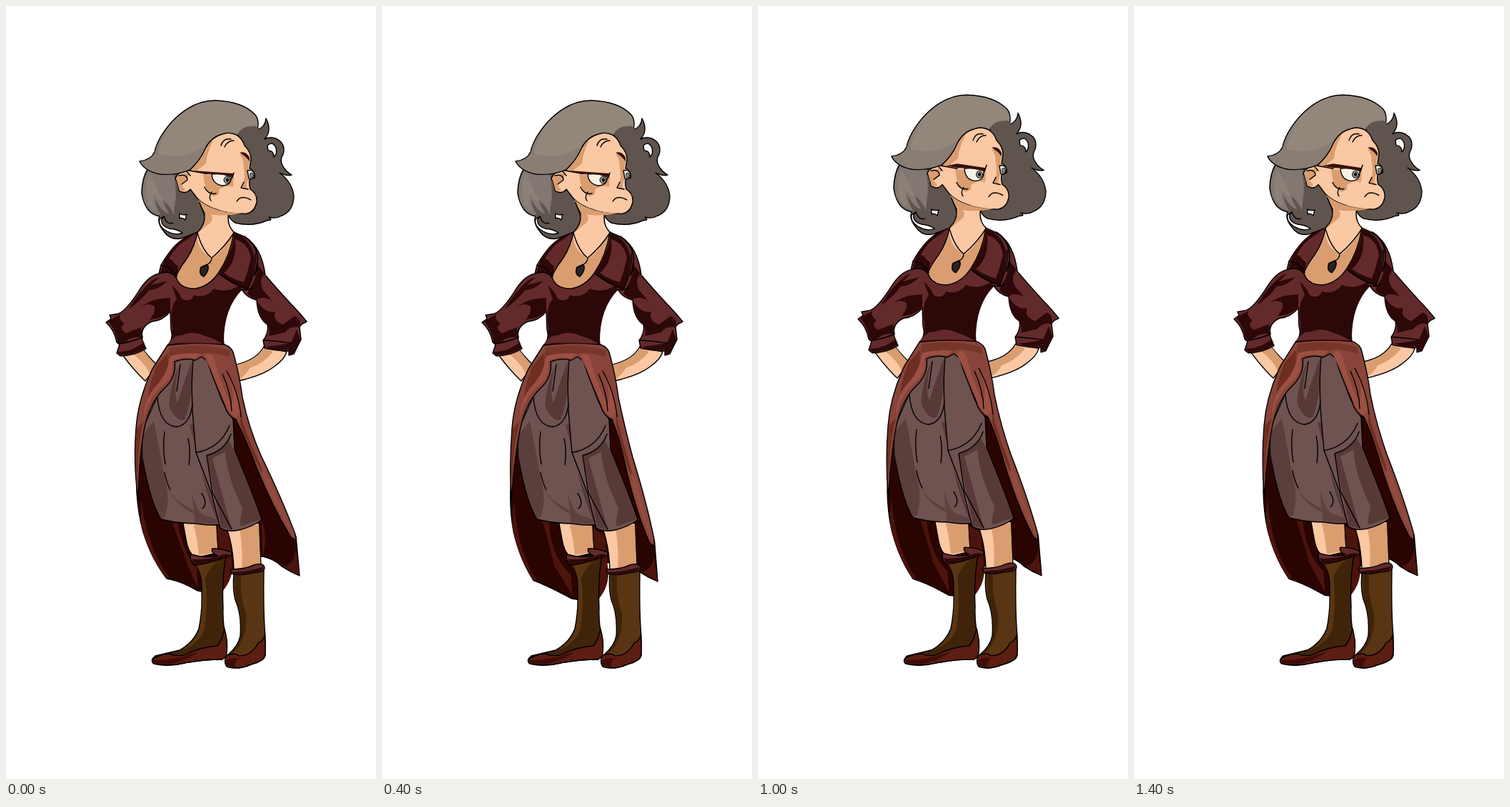
An HTML page for the animation above (1.6 s loop, 518x1080 px).

```html
<!DOCTYPE html>
<html lang="en">
<head>
<meta charset="utf-8">
<title>Idle stance</title>
<style>
html, body { margin: 0; width: 100%; height: 100%; overflow: hidden; background: #fff }
svg { display: block; width: 100%; height: 100% }
path, ellipse { stroke: #000; stroke-width: 1.4; stroke-linejoin: round; stroke-linecap: round }
.n { stroke: none }
.l { fill: none }
.white { fill: #fff }
.skin { fill: #fbc8a4 } .tan { fill: #d99d70 }
.hair { fill: #93867b } .hairMid { fill: #827871 } .hairDark { fill: #60544f }
.shirt { fill: #632a2c } .shirtDark { fill: #2d0808 }
.coat { fill: #88443a } .coatDark { fill: #6f2e22 } .coatLight { fill: #9c5043 }
.lining { fill: #2a0401 } .liningRed { fill: #4b140c }
.pants { fill: #6e5350 } .pantsDark { fill: #573a38 }
.boot { fill: #593513 } .bootDark { fill: #40240a }
.shoe { fill: #5c1d12 } .shoeDark { fill: #3f0d09 }
.eye { fill: #f6f2e6 } .iris { fill: #8d8b88; stroke-width: .9 } .brow { fill: #35100b }
</style>
</head>
<body>
<svg viewBox="0 0 518 1080">
<g id="figure">
  <!-- coat lining -->
  <path class="lining sway" d="M195 575 Q182 630 183 680 Q185 710 192 735 Q204 773 225 800 Q247 804 268 817 L299 822 L310 800 L335 770 L359 769 Q377 773 386 783 Q398 791 411 796 L406 741 Q380 690 354 630 L318 570 Z"/>
  <path class="liningRed n sway" d="M240 718 Q247 765 267 785 L269 814 Q262 800 252 775 Q243 748 231 718 Z"/>
  <path class="liningRed n sway" d="M189 690 Q199 762 229 798 L225 800 Q200 770 189 725 Z"/>
  <path class="liningRed n sway" d="M295 724 L312 733 L317 784 Q316 805 300 821 Z"/>
  <path class="liningRed n sway" d="M358 718 Q366 740 361 764 L359 768 Z"/>
  <path class="liningRed n sway" d="M388 783 Q403 780 406 760 L411 796 Z"/>

  <!-- legs -->
  <path class="skin" d="M247 718 L252 745 Q255 764 265 771 L297 764 L294 722 Z"/>
  <path class="tan n" d="M262 721 L294 722 L296 763 L270 767 Q268 745 262 721 Z"/>
  <path class="skin" d="M309 730 Q318 755 319 788 L357 782 L354 722 Z"/>
  <path class="tan n" d="M327 730 L354 724 L356 782 L330 786 Q332 758 327 730 Z"/>

  <!-- boots -->
  <path class="bootDark" d="M263 772 Q275 790 274 820 Q275 845 270 870 Q262 890 243 900 L209 908 Q201 914 207 919 Q228 924 250 918 Q275 913 303 913 Q311 905 309 886 Q303 866 304 840 Q302 800 308 768 Z"/>
  <path class="boot n" d="M264 778 Q276 792 275 820 Q275 846 271 870 Q263 891 244 901 Q272 890 278 870 Q283 830 279 800 Q284 784 299 773 Z"/>
  <path class="shoe" d="M205 914 Q211 906 229 905 Q238 909 249 907 Q270 896 296 894 Q303 885 306 870 Q311 890 309 904 Q308 911 302 913 Q275 913 250 918 Q228 923 207 919 Q204 917 205 914 Z"/>
  <path class="shoeDark n" d="M206 914 Q226 914 248 909 L270 902 Q252 916 230 919 Q214 921 207 918 Z"/>
  <path class="shirt" d="M259 766 Q278 772 296 768 Q286 763 289 758 Q303 758 315 763 Q319 769 307 770 Q282 780 263 781 Q256 773 259 766 Z"/>
  <path class="shirtDark n" d="M260 773 Q282 775 305 766 L314 766 Q310 770 303 771 Q280 779 263 780 Z"/>
  <path class="boot" d="M319 792 Q317 814 321 830 Q330 850 328 880 Q325 895 310 907 Q304 915 309 923 Q325 928 343 920 Q360 916 363 908 L363 880 Q360 850 361 788 Z"/>
  <path class="bootDark n" d="M320 796 L329 795 Q327 825 336 850 Q338 885 319 903 L311 907 Q326 895 329 880 Q330 850 322 828 Z"/>
  <path class="shoe" d="M309 907 Q321 903 326 908 Q344 908 353 890 Q359 888 362 880 Q365 900 361 911 Q354 917 343 920 Q325 928 309 923 Q304 915 309 907 Z"/>
  <path class="shoeDark n" d="M307 915 Q316 909 326 912 Q319 917 322 924 Q306 925 307 915 Z"/>
  <path class="shirt" d="M315 787 Q335 787 347 781 Q361 777 362 785 Q362 791 345 792 Q330 796 318 794 Q313 790 315 787 Z"/>
  <path class="shirtDark n" d="M317 791 Q337 791 360 784 Q361 790 345 791 Q330 795 318 793 Z"/>

  <!-- breeches -->
  <path class="pants" d="M236 490 L285 486 Q291 525 304 555 L318 578 L320 620 Q345 680 358 718 Q346 727 327 732 Q311 736 300 729 L298 725 Q285 726 265 723 Q240 723 217 717 Q203 695 193 640 Q188 615 194 585 L212 545 Z"/>
  <path class="pantsDark n" d="M191 600 Q198 590 207 580 Q215 620 222 660 Q231 690 222 714 L217 716 Q203 690 191 630 Z" opacity=".8"/>
  <path class="pantsDark n" d="M237 515 Q230 535 228 558 Q238 582 250 578 Q263 548 260 497 Q251 520 240 555 Q233 538 243 500 Z"/>
  <path class="pantsDark n" d="M257 585 L263 585 L266 624 Q275 655 287 685 L298 724 Q282 690 274 650 Z"/>
  <path class="pantsDark n" d="M215 655 Q230 698 294 717 L297 724 L265 722 L260 680 Q270 712 280 713 Q240 710 215 655 Z" opacity=".7"/>
  <path class="pantsDark n" d="M281 628 Q300 622 312 607 L320 622 Q346 684 357 717 L329 727 Q318 690 291 632 L316 732 L301 728 Z"/>
  <path class="pants n" d="M289 632 L307 623 Q310 660 331 701 L326 730 L316 731 Z"/>
  <path class="l" d="M262 495 Q258 540 263 590 L266 624 Q278 655 288 682 L299 726"/>
  <path class="l" d="M212 547 Q215 586 239 588 Q258 585 261 556"/>
  <path class="l" d="M266 624 Q300 618 313 586 M281 628 Q307 621 315 598 M281 628 L289 680 L316 731"/>
  <path class="l" d="M222 595 Q219 620 223 640 M222 652 Q224 664 230 676 M255 604 Q259 621 256 641 M274 681 Q283 695 275 702 M244 501 L239 538"/>

  <!-- forearms -->
  <path class="skin" d="M162 486 Q178 508 195 524 L212 502 Q198 489 189 476 Z"/>
  <path class="tan n" d="M176 485 L190 478 Q199 490 210 502 L201 514 Q196 500 176 485 Z"/>
  <path class="skin" d="M361 476 Q350 496 317 502 L325 524 Q360 516 375 504 Q390 494 393 483 Z"/>
  <path class="tan n" d="M319 503 Q350 496 362 478 L374 483 Q360 500 341 506 Q337 515 326 522 Z"/>

  <!-- coat panels -->
  <path class="coat sway" d="M226 474 Q269 467 306 473 Q317 477 319 487 Q328 522 331 547 Q340 590 357 628 Q388 692 405 738 L406 747 L399 742 Q370 695 345 630 Q334 602 322 578 Q309 572 305 555 Q290 522 282 496 L274 490 L265 495 Q250 491 236 497 Q239 519 221 535 Q205 550 196 580 Q187 615 185 690 Q178 640 182 590 Q185 549 205 507 Z"/>
  <path class="coatDark n" d="M211 503 L226 485 Q230 500 222 520 Q211 530 199 548 Q201 524 211 503 Z"/>
  <path class="coatDark n" d="M229 477 Q275 470 313 481 L313 490 Q284 482 274 486 Q250 482 227 492 Z" opacity=".65"/>
  <path class="coatLight n" d="M230 489 Q249 484 272 486 L265 492 Q238 489 233 497 Q236 518 217 532 Q198 549 193 578 Q193 552 207 534 Q226 516 230 489 Z"/>
  <path class="coatLight n" d="M282 486 Q292 487 294 502 Q303 535 316 558 Q321 536 309 508 Q327 538 329 567 L321 575 Q308 565 301 540 Q288 510 278 490 Z"/>
  <path class="coatDark n sway" d="M328 570 Q343 618 363 653 L357 650 Q339 618 328 585 Z"/>
  <path class="coatLight n sway" d="M350 620 Q382 693 403 739 Q386 714 365 672 Z" opacity=".6"/>
  <path class="coatDark n sway" d="M193 580 Q183 615 185 670 Q179 637 183 590 Z"/>
  <path class="l" d="M303 514 Q315 540 316 566 M309 510 Q326 540 329 574"/>

  <!-- neck and chest -->
  <path class="tan" d="M270 274 L278 290 Q277 304 267 317 Q241 350 235 380 Q246 402 265 398 Q287 393 300 374 Q315 347 320 317 Q307 305 313 285 Z"/>
  <path class="skin n" d="M285 289 Q294 299 282 306 L268 318 Q267 332 275 342 L288 354 Q307 340 318 317 Q307 304 310 290 Z"/>

  <!-- shirt -->
  <path class="shirt" d="M268 316 Q239 323 217 362 L214 374 Q199 377 186 398 Q168 426 157 430 L145 432 L147 437 L140 442 Q152 453 155 470 L159 473 L155 485 L160 489 Q179 489 196 479 L191 467 Q187 448 204 441 Q219 440 230 427 L231 452 Q235 466 226 474 Q268 469 305 473 Q301 440 315 414 Q324 400 330 396 Q337 408 351 411 Q352 436 366 445 Q368 457 360 467 L362 478 Q380 482 396 482 L396 488 L403 486 L413 466 L411 448 L415 444 L421 441 L411 429 Q388 405 363 376 Q358 337 335 323 L319 316 Q314 348 298 372 Q285 392 264 395 Q243 395 238 379 Q241 369 251 356 Q264 338 268 316 Z"/>
  <path class="shirtDark n" d="M232 390 Q241 398 247 409 Q257 415 263 404 Q280 409 291 395 Q310 402 327 390 L330 397 Q304 424 305 472 L228 472 Q236 458 232 440 Q230 420 239 409 Z"/>
  <path class="shirt n" d="M228 472 Q235 459 247 460 Q262 453 276 460 Q292 465 303 472 Q268 469 228 472 Z"/>
  <path class="shirtDark n" d="M220 361 Q233 327 264 319 Q244 330 234 358 L241 364 L239 378 Q230 370 216 373 Z"/>
  <path class="shirt n" d="M228 353 Q239 332 260 323 Q244 339 239 359 Z"/>
  <path class="shirtDark n" d="M310 352 Q320 330 319 318 Q342 323 348 351 Q346 380 338 396 Q318 391 298 375 Z"/>
  <path class="shirt n" d="M321 326 Q340 332 343 353 Q339 370 333 386 Q318 382 305 373 Q324 357 321 326 Z"/>
  <path class="shirtDark n" d="M191 397 Q206 380 214 379 L203 390 L226 384 Q213 397 200 397 Q187 414 172 423 Q183 405 191 397 Z"/>
  <path class="shirtDark n" d="M143 440 L160 431 Q157 438 166 444 Q157 450 168 457 L189 449 L192 463 Q176 461 168 469 L156 472 Q156 456 143 440 Z"/>
  <path class="shirtDark n" d="M201 438 Q211 426 207 419 Q199 414 188 421 Q204 408 230 408 L230 426 Q218 438 201 438 Z"/>
  <path class="shirtDark n" d="M156 483 Q175 484 193 470 L195 478 Q178 488 160 488 Z"/>
  <path class="shirtDark n" d="M341 394 Q352 381 351 360 L362 374 Q353 385 360 397 L372 411 Q359 405 352 410 Q344 409 338 402 Z"/>
  <path class="shirtDark n" d="M352 413 Q363 430 377 427 Q372 439 388 445 L404 433 Q414 437 411 449 Q398 446 391 456 L368 461 Q371 447 360 441 Q354 432 352 413 Z"/>
  <path class="shirtDark n" d="M364 476 Q384 474 399 471 L407 452 L412 466 L403 485 L397 486 L395 480 Q377 482 364 476 Z"/>
  <path class="l" d="M157 472 Q174 470 191 463 M362 467 Q380 468 399 471 M217 362 Q232 364 239 378 M349 346 Q351 368 338 396 Q318 388 299 374"/>
  <path class="l" d="M334 322 Q361 340 348 376" style="stroke-width:2"/>
  <path class="l" d="M214 374 Q231 368 239 381 M330 396 Q339 398 345 394"/>
  <ellipse class="shirt n" cx="253" cy="405" rx="9" ry="6"/>

  <!-- pendant -->
  <path class="l" d="M268 317 Q275 342 288 352 Q306 337 319 317 M288 352 Q288 358 281 362"/>
  <path style="fill:#282421" d="M282 361 Q286 368 277 378 Q269 375 273 365 Z"/>

  <!-- hair behind the head -->
  <path class="hairDark" d="M322 178 L352 173 Q363 169 364 157 Q373 174 362 186 Q374 180 385 190 Q391 197 388 207 Q382 216 389 226 Q394 233 400 236 Q392 238 383 233 Q401 246 403 266 Q402 287 386 293 Q378 298 368 295 Q374 300 367 299 Q345 309 321 303 Q311 298 309 283 L333 250 Z"/>
  <path class="white" d="M366 195 Q373 188 378 198 Q380 207 375 211 Q375 202 367 202 Z"/>
  <path class="hairDark" d="M198 228 Q190 242 190 262 Q195 291 215 294 Q211 303 221 315 Q229 327 244 325 Q258 320 268 316 Q281 303 277 290 L271 275 L280 265 L262 240 L235 230 Z"/>
  <path class="hairMid n" d="M199 230 Q188 249 193 272 Q201 291 217 292 Q210 282 209 270 Q218 288 228 290 L218 270 Q232 281 235 292 L236 280 Q240 263 235 234 Z"/>
  <path class="hair n" d="M201 234 Q192 254 199 277 Q205 285 209 287 Q204 268 207 264 Q217 273 222 277 Q214 260 201 234 Z" opacity=".65"/>
  <path class="white" d="M243 290 Q248 293 253 291 L251 299 Q247 295 243 297 Z"/>
  <path class="white" d="M218 298 Q216 307 229 311 Q241 312 247 317 Q237 321 226 315 Q213 308 215 298 L221 294 Z"/>
  <path class="l" d="M221 294 Q225 306 234 303"/>

  <!-- face -->
  <path class="skin" d="M237 241 Q242 229 257 230 Q272 215 278 199 Q288 178 314 177 Q329 180 334 195 Q343 204 343 214 L341 227 Q349 230 348 240 L341 242 Q340 249 342 256 Q352 262 351 274 Q348 288 337 290 Q310 291 294 284 Q278 279 268 269 L258 256 Q252 264 242 258 Q241 247 237 241 Z"/>
  <path class="tan n" d="M258 230 Q272 216 279 200 Q283 190 292 184 Q281 205 280 220 L266 231 Z"/>
  <path class="tan n" d="M238 241 Q244 234 257 233 L254 243 L245 249 L251 257 Q246 260 243 257 Z"/>
  <path class="tan n" d="M276 235 L319 238 L318 253 Q309 249 298 257 Q301 264 290 266 Q278 260 276 235 Z"/>
  <path class="tan n" d="M327 207 Q338 207 341 216 L339 227 Q347 230 346 240 L339 243 Q336 249 337 255 L330 253 Q336 243 333 226 Q333 214 327 207 Z"/>
  <path class="tan n" d="M269 270 Q278 279 294 284 Q314 291 335 288 Q302 296 281 290 Z"/>
  <path class="l" d="M242 237 Q253 234 254 243 L246 249 M251 229 L258 237 M257 230 L279 234"/>
  <path class="l" d="M278 253 Q283 264 294 262 M288 260 Q283 267 287 272 M301 195 Q304 184 315 186 M306 197 Q310 188 319 188"/>
  <path class="l" d="M333 246 L329 254 L339 256 M323 273 Q329 263 343 271"/>
  <path class="brow n" d="M327 205 Q336 202 341 212 L341 217 Q335 209 327 205 Z"/>

  <!-- eyes, one group per expression -->
  <g class="look">
    <path class="eye" d="M288 235 Q304 233 315 239 Q316 250 303 251 Q289 249 288 235 Z"/>
    <ellipse class="iris" cx="309.500" cy="243" rx="4.500" ry="5"/>
    <ellipse class="n" cx="310" cy="243" rx="2" ry="2.500"/>
    <path class="brow n" d="M263 230 L290 232 L319 234 L318 239 Q301 234 280 235 Z"/>
    <path class="l" d="M319 233 L316 241"/>
  </g>
  <g class="look">
    <path class="eye" d="M289 234 Q303 232 316 237 Q317 251 303 251 Q290 249 289 234 Z"/>
    <ellipse class="iris" cx="310" cy="242" rx="4.500" ry="5"/>
    <ellipse class="n" cx="310" cy="242" rx="2" ry="2.500"/>
    <path class="brow n" d="M264 230 L279 227 L319 233 L318 238 Q301 233 280 233 Z"/>
    <path class="l" d="M320 229 L317 238"/>
  </g>
  <g class="look">
    <path class="eye" d="M289 239 Q304 236 315 240 Q316 250 303 251 Q290 249 289 239 Z"/>
    <ellipse class="iris" cx="309.500" cy="244" rx="4.500" ry="4"/>
    <ellipse class="n" cx="310" cy="244" rx="2" ry="2"/>
    <path class="brow n" d="M263 230 L290 232 L319 234 L318 239 Q301 236 280 236 Z"/>
    <path class="l" d="M319 233 L316 241"/>
  </g>
  <path class="eye" d="M338 230 Q347 228 348 236 Q347 243 340 241 Z"/>
  <ellipse class="iris" cx="344" cy="236.500" rx="2.500" ry="3.500"/>

  <!-- front hair -->
  <path class="hair" d="M187 217 Q203 215 208 204 Q212 185 231 163 Q260 132 292 132 Q331 133 349 152 Q355 159 352 174 L339 172 Q329 173 325 181 Q314 175 303 179 Q287 183 279 199 Q272 216 257 229 Q238 237 216 235 Q194 231 187 217 Z"/>
  <path class="hairMid n" d="M188 217 Q204 215 209 204 Q213 186 231 164 Q213 195 214 207 Q246 216 278 197 Q270 217 256 228 Q238 236 216 234 Q195 230 188 217 Z" opacity=".6"/>
  <path class="hairDark n" d="M324 179 Q331 166 351 168 L354 174 L349 182 L334 184 Z"/>
</g>
</svg>
<script>
const figure = document.getElementById('figure');
const looks = [...document.querySelectorAll('.look')];
const panels = [...document.querySelectorAll('.sway')].map(el => ({ el, d: el.getAttribute('d') }));

// hem offsets: right side x, right side y, left side x, left side y
const hems = [[0, 0, 0, 0], [-14, 1, -8, 7], [-25, 8, -13, 11], [-14, 1, -8, 7]];
const ramp = (y, from, to) => Math.min(1, Math.max(0, (y - from) / (to - from)));

function sway(d, [rx, ry, lx, ly]) {
  return d.replace(/(\d+) (\d+)/g, (_, x, y) => {
    x = +x; y = +y;
    const right = x > 318, k = right ? ramp(y, 590, 745) : ramp(y, 640, 800);
    const lift = right ? ry : ly * ramp(x, 212, 268);
    return `${x + (right ? rx : x < 285 ? lx * (x > 255 ? .2 : 1) : 0) * k} ${y + lift * k}`;
  });
}

let shown = -1;
function draw(now) {
  const step = Math.floor(now / 200) % 8;
  if (step !== shown) {
    shown = step;
    const raised = step % 2;
    // breathe by stretching upward from the soles
    figure.setAttribute('transform', raised ? 'translate(0 925) scale(1 1.0098) translate(0 -925)' : '');
    panels.forEach(({ el, d }) => el.setAttribute('d', sway(d, hems[step % 4])));
    const look = raised ? 1 : step === 4 ? 2 : 0;
    looks.forEach((el, i) => el.style.display = i === look ? '' : 'none');
  }
  requestAnimationFrame(draw);
}
draw(performance.now());
</script>
</body>
</html>
```
